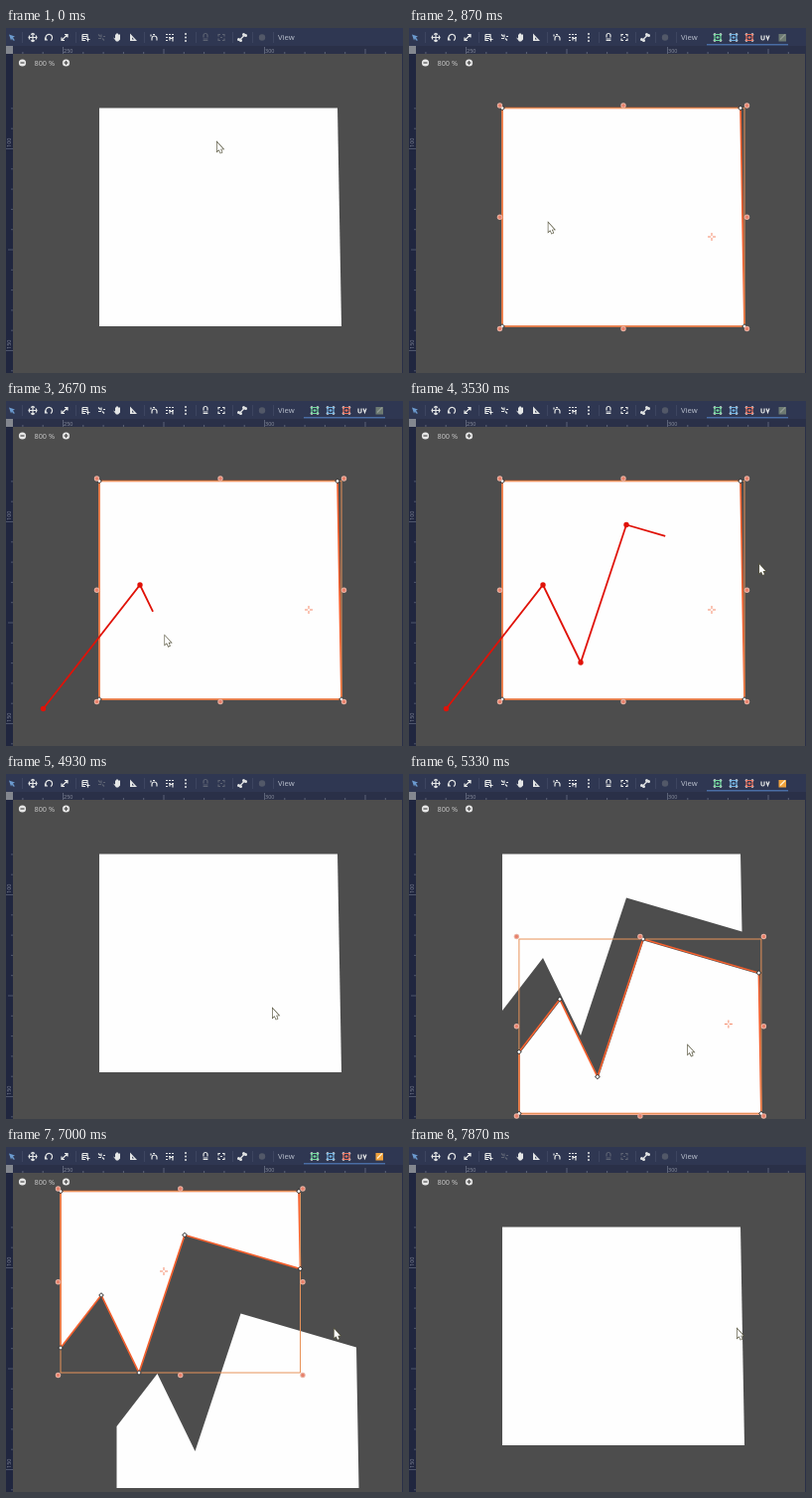
These frames come from a looping animation (400 px wide and 347 px high, 7.93 s). An HTML page with a canvas:

```html
<!DOCTYPE html>
<html lang="en">
<head>
<meta charset="utf-8">
<title>Polygon cut</title>
<style>
html, body { margin: 0; width: 100%; height: 100%; overflow: hidden; background: #4d4d4d; }
canvas { display: block; }
</style>
</head>
<body>
<canvas id="stage" width="400" height="347"></canvas>
<script>
const ctx = document.getElementById('stage').getContext('2d');
const LOOP = 7930, STEP = 200 / 3;
const SELECT = 270, CUT = 4200;
const GRAB_LOW = 5000, DROP_LOW = 5300, GRAB_TOP = 5560, DROP_TOP = 6530;
const UNDO_TOP = 7280, UNDO_LOW = 7520, UNDO_CUT = 7800;
const BG = '#4d4d4d', PAPER = '#fefefe', ON = '#e4e6e6', DIM = '#5c6272';

const corners = [[94, 80.5], [334, 80.5], [338, 300], [94, 300]];
const clicks = [[37.5, 309.5], [135, 185], [173, 263], [219, 124.5], [372, 169]];
const cut = [[94, 238], ...clicks.slice(1, 4), [335.5, 158.5]];
const whole = { points: corners, pivot: [305, 210] };
const upper = { points: [...corners.slice(0, 2), ...[...cut].reverse()], pivot: [198, 161] };
const lower = { points: [...cut, ...corners.slice(2)], pivot: [305, 210] };

// Mouse moves: when each starts and ends, and where it goes
const moves = [
  [340, 1530, clicks[0]], [1930, 2330, clicks[1]], [2470, 2800, clicks[2]],
  [2930, 3270, clicks[3]], [3417, 3567, clicks[4]], [4270, 4870, [268, 235]],
  [GRAB_LOW, DROP_LOW, [285.5, 278]], [DROP_LOW, GRAB_TOP, [168, 143]],
  [GRAB_TOP, 6160, [129, 107]], [6570, 6800, [330, 182]]];

function cursorAt(t) {
  let pos = [212, 114];
  for (const [start, end, to] of moves) {
    const u = Math.min(1, Math.max(0, (t - start) / (end - start)));
    const ease = u * u * (3 - 2 * u);
    pos = pos.map((v, i) => v + (to[i] - v) * ease);
  }
  return pos;
}
function dragged(t, grab, drop, undo) {
  if (t < grab || t >= undo) return [0, 0];
  const from = cursorAt(grab);
  return cursorAt(Math.min(t, drop)).map((v, i) => v - from[i]);
}
const upperOffset = t => dragged(t, GRAB_TOP, DROP_TOP, UNDO_TOP);
const lowerOffset = t => dragged(t, GRAB_LOW, DROP_LOW, UNDO_LOW);

function rect(x, y, w, h, color) {
  ctx.fillStyle = color;
  ctx.fillRect(x, y, w, h);
}
function dot(x, y, r, fill) {
  ctx.beginPath();
  ctx.arc(x, y, r, 0, 7);
  ctx.fillStyle = fill;
  ctx.fill();
}
function trace(points) {
  ctx.beginPath();
  points.forEach(p => ctx.lineTo(...p));
}
function line(points, color, width, closed) {
  trace(points);
  if (closed) ctx.closePath();
  ctx.strokeStyle = color;
  ctx.lineWidth = width;
  ctx.stroke();
}
function text(s, x, y, size, color) {
  ctx.font = `${size}px "Noto Sans", sans-serif`;
  ctx.fillStyle = color;
  ctx.fillText(s, x, y);
}
function at(x, y, draw, angle = 0) {
  ctx.save();
  ctx.translate(x, y);
  ctx.rotate(angle);
  draw();
  ctx.restore();
}
function icon(x, d, color, filled) {
  at(x, 9.5, () => {
    ctx.strokeStyle = ctx.fillStyle = color;
    ctx.lineWidth = 1.2;
    ctx[filled ? 'fill' : 'stroke'](new Path2D(d));
  });
}
function fillShape({ points }, offset) {
  at(...offset, () => {
    trace(points);
    ctx.fillStyle = PAPER;
    ctx.fill();
  });
}

function drawSelection({ points, pivot }, offset) {
  at(...offset, () => {
    const xs = points.map(p => p[0]), ys = points.map(p => p[1]);
    const l = Math.min(...xs), r = Math.max(...xs), t = Math.min(...ys), b = Math.max(...ys);
    line(points, '#f4602e', 1.7, true);
    line([[l, t], [r, t], [r, b], [l, b]], '#e8935a', 1, true);
    for (const [x, y] of points) {
      at(x, y, () => {
        rect(-2, -2, 4, 4, '#333');
        rect(-1.2, -1.2, 2.4, 2.4, '#fff');
      }, Math.PI / 4);
    }
    for (const i of [-1, 0, 1]) for (const j of [-1, 0, 1]) {
      if (!i && !j) continue;
      const x = (l + r) / 2 + i * ((r - l) / 2 + 2.5), y = (t + b) / 2 + j * ((b - t) / 2 + 2.5);
      dot(x, y, 2.7, '#e9b3a4');
      dot(x, y, 1.7, '#e8806a');
    }
    for (let k = 0; k < 4; k++) {
      at(...pivot, () => rect(1, -0.5, 3, 1, '#f58a6a'), k * Math.PI / 2);
    }
  });
}

function drawCutLine(t) {
  const placed = clicks.filter((_, i) => moves[i + 1][0] <= t);
  if (!placed.length || t >= CUT) return;
  line([...placed, cursorAt(t - STEP)], '#e01208', 1.8);
  placed.forEach(p => dot(...p, 2.7, '#e01208'));
}

function drawRulers() {
  rect(0, 18, 400, 8, '#2a3048');
  rect(0, 26, 7, 321, '#20263f');
  for (let i = -2; i < 17; i++) {
    const n = i % 10 === 0 ? 7 : i % 5 === 0 ? 5 : 2;
    rect(57 + i * 20.3, 26 - n, 1, n, '#5c6378');
    rect(7 - n, 121 + i * 20.3, n, 1, '#4f566c');
  }
  rect(0, 18, 7, 8, '#83878f');
  for (const k of [0, 1]) {
    text(250 + 50 * k, 58 + 203 * k, 24.7, 5.5, '#858b9a');
    at(5, 120 + 203 * k, () => text(100 + 50 * k, 0, 0, 5.5, '#7b8192'), -Math.PI / 2);
  }
  rect(399, 18, 1, 329, '#2a3048');
}

function drawToolbar(selected, active) {
  const lit = selected ? ON : DIM;
  rect(0, 0, 400, 18, '#2f3752');
  for (const x of [16, 70, 139, 191, 228, 248, 269]) rect(x, 4, 1, 11, '#3d4560');
  icon(6, 'M-3-3L3-1L1 0L3 3L1 3L0 1L-1 3Z', '#6c9bd0', true);
  icon(27, 'M-4 0H4M0-4V4M-2-3L0-4L2-3M-2 3L0 4L2 3M-3-2L-4 0L-3 2M3-2L4 0L3 2', ON);
  icon(43, 'M-2.5 2A3.3 3.3 0 1 1 2 3M-3.5 0V2.5H-1', ON);
  icon(59, 'M-3 3L3-3M0-3H3V0M-3 0V3H0', ON);
  icon(80, 'M-3-3H2V0M-3-3V3H0M-3-1H2M-3 1H1M2.5 0V4M1 2H4.5', ON);
  icon(96, 'M-3-3L-1-1M3 3L1 1M-3 1H0M0-3V0M2-1H4', lit);
  icon(112, 'M-4 0L-2 1V-3H-1V-4H1V-3H3V2L1 4H-1Z', ON, true);
  icon(128, 'M-3-4L4 3.5H-3ZM-1 0V2H1Z', ON, true);
  icon(149, 'M-3-3V-1M-1-3H1M-2 3V1A2 2 0 0 1 3 1V3', ON);
  icon(165, 'M-4-3H-2M-1-3H1M2-3H4M-4 0H-2M-1 0H1M2 0H4M-4 3H-2M0 3V1H3V4', ON);
  for (const k of [-1, 0, 1]) dot(181, 9.5 + 3.5 * k, 1, ON);
  icon(201, 'M-2 0V-2A2 2 0 0 1 2-2V0M-2.4 1.5H2.4M-2.4 3H2.4', lit);
  icon(217, 'M-3-1V-3H-1M1-3H3V-1M3 1V3H1M-1 3H-3V1M-1 0H1', lit);
  icon(238, 'M-2 2L2-2', ON);
  for (const k of [-1, 1]) {
    dot(237 + 2.5 * k, 9 - 2.5 * k, 1.5, ON);
    dot(239 + 2.5 * k, 10 - 2.5 * k, 1.5, ON);
  }
  dot(258, 9.5, 3.2, '#525868');
  text('View', 274, 12.3, 7.6, '#b4bac8');
  if (!selected) return;
  rect(300, 16.3, 82, 1, '#5585c8');
  ['#6fd69a', '#6fb0e0', '#e8705c'].forEach((color, i) => {
    const x = 311 + 16 * i;
    for (const dx of [-3, 3]) for (const dy of [-3, 3]) dot(x + dx, 9.5 + dy, 1.3, ON);
    icon(x, 'M-3-3H3V3H-3Z', color);
    icon(x, 'M-1.5 0H1.5M0-1.5V1.5', color);
  });
  icon(359, 'M-4-2V1A1.5 1.5 0 0 0-1 1V-2M1-2L2.5 2L4-2', ON);
  rect(372.5, 6, 7.5, 7.5, active ? '#f0a23c' : '#6d7a72');
  icon(376, 'M-2 2L3-3', active ? '#fff0d0' : '#939b96');
}

function drawZoom() {
  for (const x of [16.5, 60.5]) {
    dot(x, 35, 3.6, '#e6e6e6');
    rect(x - 2, 34.4, 4, 1.2, BG);
  }
  rect(59.9, 33, 1.2, 4, BG);
  text('800 %', 28.5, 37.8, 7.3, '#c4c4c4');
}

function drawCursor(t) {
  const dragging = (t >= GRAB_LOW && t < DROP_LOW) || (t >= GRAB_TOP && t < DROP_TOP);
  const [x, y] = cursorAt(t);
  const path = new Path2D(dragging
    ? 'M0-6L2.5-3H1V-1H3V-2.5L6 0L3 2.5V1H1V3H2.5L0 6L-2.5 3H-1V1H-3V2.5L-6 0L-3-2.5V-1H-1V-3H-2.5Z'
    : 'M.7 1V10L2.6 8.2L4.2 11.7L5.6 11L4.2 7.7H6.8Z');
  at(x, y, () => {
    ctx.lineWidth = 1.3;
    ctx.strokeStyle = '#55533c';
    ctx.stroke(path);
    ctx.fillStyle = PAPER;
    ctx.fill(path);
  });
}

function draw(t) {
  rect(0, 0, 400, 347, BG);
  if (t < GRAB_LOW || t >= UNDO_LOW) {
    fillShape(whole, [0, 0]);
  } else {
    fillShape(lower, lowerOffset(t));
    fillShape(upper, upperOffset(t));
  }
  const onWhole = t >= SELECT && t < CUT;
  const onLower = t >= GRAB_LOW && t < GRAB_TOP;
  const onUpper = t >= GRAB_TOP && t < UNDO_CUT;
  // Outlines trail the shapes by one step
  if (onWhole) drawSelection(whole, [0, 0]);
  if (onLower) drawSelection(lower, lowerOffset(t - STEP));
  if (onUpper) drawSelection(upper, upperOffset(t - STEP));
  drawCutLine(t);
  drawRulers();
  drawToolbar(onWhole || onLower || onUpper, onLower || onUpper);
  drawZoom();
  drawCursor(t);
}

const start = performance.now();
function tick() {
  const t = (performance.now() - start) % LOOP;
  draw(Math.floor((t + 5) / STEP) * STEP);
  requestAnimationFrame(tick);
}
tick();
</script>
</body>
</html>
```
